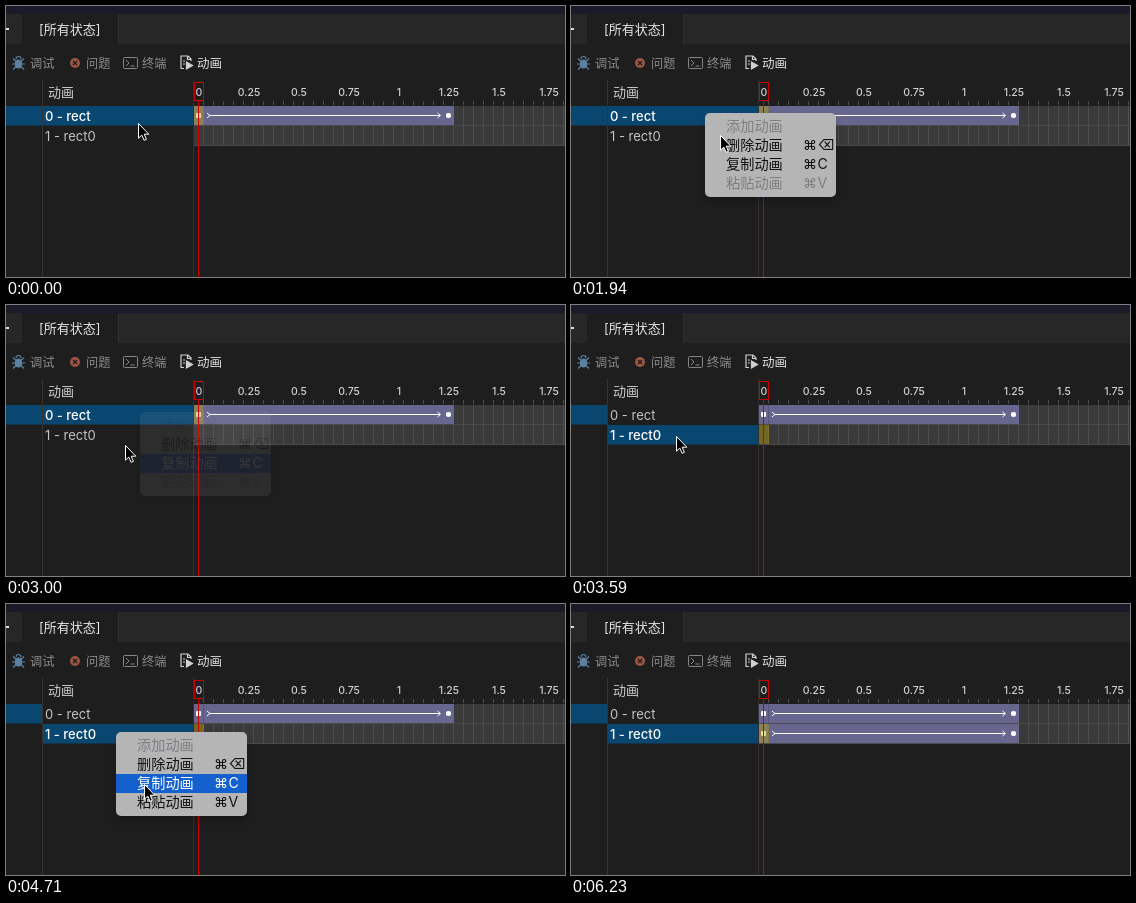
Write an HTML page that moves like this. It is 559 px wide and 271 px high and loops after 6830 ms.

```html
<!DOCTYPE html>
<html lang="zh">
<head>
<meta charset="utf-8">
<title>动画</title>
<style>
html, body { margin: 0; width: 100%; height: 100%; overflow: hidden; background: #1e1e1e; }
svg { display: block; width: 559px; height: 271px; }
text { font-family: Inter, "Noto Sans CJK SC", "Noto Sans CJK", "DejaVu Sans", sans-serif; white-space: pre; }
</style>
</head>
<body>
<svg id="stage" viewBox="0 0 559 271" xmlns="http://www.w3.org/2000/svg">
  <defs>
    <filter id="blur" x="-20%" y="-20%" width="140%" height="140%"><feGaussianBlur stdDeviation="4"/></filter>
  </defs>
  <rect width="559" height="271" fill="#1e1e1e"/>
  <rect width="559" height="8" fill="#1b1a28"/>
  <rect y="8" width="559" height="30" fill="#272728"/>
  <rect x="16" y="8" width="96" height="30" fill="#1e1e1e"/>
  <rect x="112" y="8" width="1" height="30" fill="#303031"/>
  <rect y="22" width="3" height="2" fill="#ddd"/>
  <g id="labels"></g>

  <g stroke="#5d82a0" fill="none" stroke-width="1.2">
    <ellipse cx="12.5" cy="58" rx="3" ry="4" fill="#5d82a0"/>
    <path d="M10 53a2.5 2.5 0 0 1 5 0M6 58h13M7 52.5l3 3M18 52.5l-3 3M7 63.5l3-3M18 63.5l-3-3"/>
  </g>
  <circle cx="69" cy="57" r="5" fill="#9c5443"/>
  <path d="M67 55l4 4M71 55l-4 4" stroke="#1e1e1e" stroke-width="1.3"/>
  <g stroke="#858585" fill="none">
    <rect x="117.500" y="51.500" width="14" height="11" rx="1"/>
    <path d="M120 54l3 3-3 3M124.500 60h4"/>
  </g>
  <g stroke="#d0d0d0" fill="none" stroke-width="1.2">
    <path d="M178 62.500h-3v-12.500h7l3 3v2M181.500 50v3.500h3.500"/>
    <path d="M180.500 56v7l6-3.500z" fill="#d0d0d0"/>
    <path d="M177 55h2M177 58h2"/>
  </g>

  <g id="rows"></g>
  <rect x="36" y="74" width="1" height="197" fill="#343434"/>
  <rect x="187" y="74" width="1" height="197" fill="#303030"/>
  <g id="grid"></g>
  <g id="bars"></g>
  <rect id="pick" x="188" width="10" height="19" fill="rgb(200,170,0)" opacity=".4"/>
  <g id="ruler"></g>
  <rect x="188.500" y="76.500" width="9" height="18" fill="none" stroke="#c40000"/>
  <rect x="192" y="95" width="1" height="176" fill="#c80000"/>
  <g id="menus"></g>
  <path id="cursor" d="M.5.5v14.700l3.300-3.100 2.300 5.200 2.300-1-2.200-5.100h4.600z" fill="#000" stroke="#fff" stroke-width="1"/>
</svg>
<script>
const $ = id => document.getElementById(id);
const LOOP = 6830, SELECT = 3530, PASTE = 5590;

function add(parent, tag, attrs, text) {
  const el = document.createElementNS('http://www.w3.org/2000/svg', tag);
  for (const k in attrs) el.setAttribute(k, attrs[k]);
  if (text) el.textContent = text;
  parent.appendChild(el);
  return el;
}
const rect = (p, x, y, width, height, fill, more) => add(p, 'rect', { x, y, width, height, fill, ...more });
const label = (p, x, y, size, fill, str, more) => add(p, 'text', { x, y, 'font-size': size, fill, ...more }, str);
const show = (el, on) => el.setAttribute('visibility', on ? 'visible' : 'hidden');

// Static labels
label($('labels'), 33, 28, 13, '#e4e4e4', '[所有状态]');
[[24, '调试'], [80, '问题'], [136, '终端']].forEach(([x, s]) => label($('labels'), x, 61.500, 12.200, '#8c8c8c', s));
label($('labels'), 191, 61.500, 12.500, '#e0e0e0', '动画', { 'font-weight': 500 });
label($('labels'), 42, 91, 13, '#cfcfcf', '动画');

// Track names
rect($('rows'), 0, 100, 36, 19.500, '#094771');
const rows = ['0 - rect', '1 - rect0'].map((name, i) => ({
  back: rect($('rows'), 37, 100 + 20 * i, 150, 19.500, '#094771'),
  name: label($('rows'), 39, 115 + 20 * i, 13, '#ccc', name)
}));

// Cells and ruler
for (let r = 0; r < 2; r++) {
  rect($('grid'), 188, 100 + 20 * r, 371, 19, '#3a3a3a');
  for (let x = 197; x < 559; x += 10) rect($('grid'), x, 100 + 20 * r, 1, 19, '#4d4d4d');
  rect($('grid'), 188, 119 + 20 * r, 371, 1, '#4a4a4a');
}
for (let x = 197; x < 559; x += 10) rect($('ruler'), x, 95, 1, 4, '#4d4d4d');
for (let i = 0; i < 8; i++) {
  label($('ruler'), 193 + 50 * i, 90, 10.500, '#d0d0d0', String(i / 4), { 'text-anchor': 'middle', 'font-weight': 500 });
}

// Animation bars
const bars = [0, 20].map(dy => {
  const g = add($('bars'), 'g', { transform: `translate(0 ${dy})` });
  rect(g, 188, 100, 260, 19, '#66668f');
  rect(g, 197, 100, 1, 19, '#55557a');
  rect(g, 190, 107, 5, 5, '#fff', { rx: 1 });
  add(g, 'path', { d: 'M201 107l3 2.500-3 2.500M203 109.500h231M431.500 107l3 2.500-3 2.500', fill: 'none', stroke: '#fff' });
  rect(g, 440, 107, 5, 5, '#fff', { rx: 2 });
  return g;
});

// Context menus
const ITEMS = [['添加动画', ''], ['删除动画', '⌘⌫'], ['复制动画', '⌘C'], ['粘贴动画', '⌘V']];
function makeMenu(x, y, off, times) {
  const g = add($('menus'), 'g', { transform: `translate(${x} ${y})` });
  rect(g, 0, 6, 131, 82, '#000', { rx: 6, opacity: .22, filter: 'url(#blur)' });
  rect(g, 0, 0, 131, 84, '#b5b5b6', { rx: 5 });
  const bar = rect(g, 0, 0, 131, 19, '#1560cf');
  const texts = ITEMS.map(([name, keys], i) => {
    const base = 18.300 + 19 * i, t = add(g, 'g', {});
    label(t, 21, base, 14.200, 'inherit', name).removeAttribute('fill');
    [...keys].forEach((k, j) => label(t, 98 + 14.500 * j, base, 14, 'inherit', k).removeAttribute('fill'));
    return t;
  });
  return { g, bar, texts, x, y, off, ...times };
}
const menus = [
  makeMenu(134, 107, [0, 3], { open: 1240, click: 2720, fade: 2770, end: 3050, row: 2 }),
  makeMenu(110, 128, [0], { open: 3950, click: 5130, fade: 5180, end: 5405, row: 3 })
];
const FADE = [1, .88, .63, .32, .1];

function drawMenu(m, t, x, y) {
  const on = t >= m.open && t < m.end;
  show(m.g, on);
  if (!on) return;
  let hi = Math.floor((y - m.y - 4) / 19);
  if (x < m.x || m.off.includes(hi)) hi = -1;
  if (t >= m.click) hi = t < m.fade ? -1 : m.row;
  m.bar.setAttribute('y', 4 + 19 * hi);
  m.bar.setAttribute('opacity', hi < 0 ? 0 : 1);
  m.texts.forEach((el, i) => el.setAttribute('fill', i === hi ? '#fff' : m.off.includes(i) ? '#7f7f80' : '#111'));
  const step = t < m.fade ? 0 : Math.min(4, Math.floor((t - m.fade + 5) / 57));
  m.g.setAttribute('opacity', FADE[step]);
}

// Cursor moves: first step, last step, step count, end x, end y, easing power
const START = [132, 117];
const MOVES = [
  [170, 230, 2, 132, 114], [530, 580, 2, 131, 111],
  [940, 940, 1, 126, 111], [1000, 1000, 1, 130, 111], [1240, 1240, 1, 130, 110],
  [1530, 2060, 9, 155, 134], [2300, 2360, 2, 158, 153],
  [2890, 3000, 3, 119, 140], [3060, 3110, 2, 70, 135], [3170, 3230, 2, 104, 133],
  [3530, 3590, 2, 105, 131], [4240, 4240, 1, 108, 135], [4300, 4830, 9, 147, 193],
  [6000, 6170, 4, 398, 262, 1.500], [6230, 6230, 1, 470, 300]
];
function cursorAt(t) {
  let [x, y] = START;
  for (const [from, to, n, ex, ey, pow = 1] of MOVES) {
    if (t < from) break;
    const i = n > 1 ? Math.floor((t - from + 5) / (to - from) * (n - 1)) : 0;
    const p = Math.min(1, (i + 1) / n) ** pow;
    x += (ex - x) * p;
    y += (ey - y) * p;
  }
  return [x, y];
}

function draw(t) {
  const [x, y] = cursorAt(t), sel = t < SELECT ? 0 : 1;
  $('cursor').setAttribute('transform', `translate(${Math.round(x)} ${Math.round(y)})`);
  rows.forEach((r, i) => {
    show(r.back, i === sel);
    r.name.setAttribute('fill', i === sel ? '#fff' : '#c4c4c4');
    r.name.setAttribute('font-weight', i === sel ? 500 : 400);
  });
  $('pick').setAttribute('y', 100 + 20 * sel);
  show(bars[1], t >= PASTE);
  menus.forEach(m => drawMenu(m, t, x, y));
}

const begin = performance.now();
function tick() {
  draw((performance.now() - begin) % LOOP);
  requestAnimationFrame(tick);
}
tick();
</script>
</body>
</html>
```
